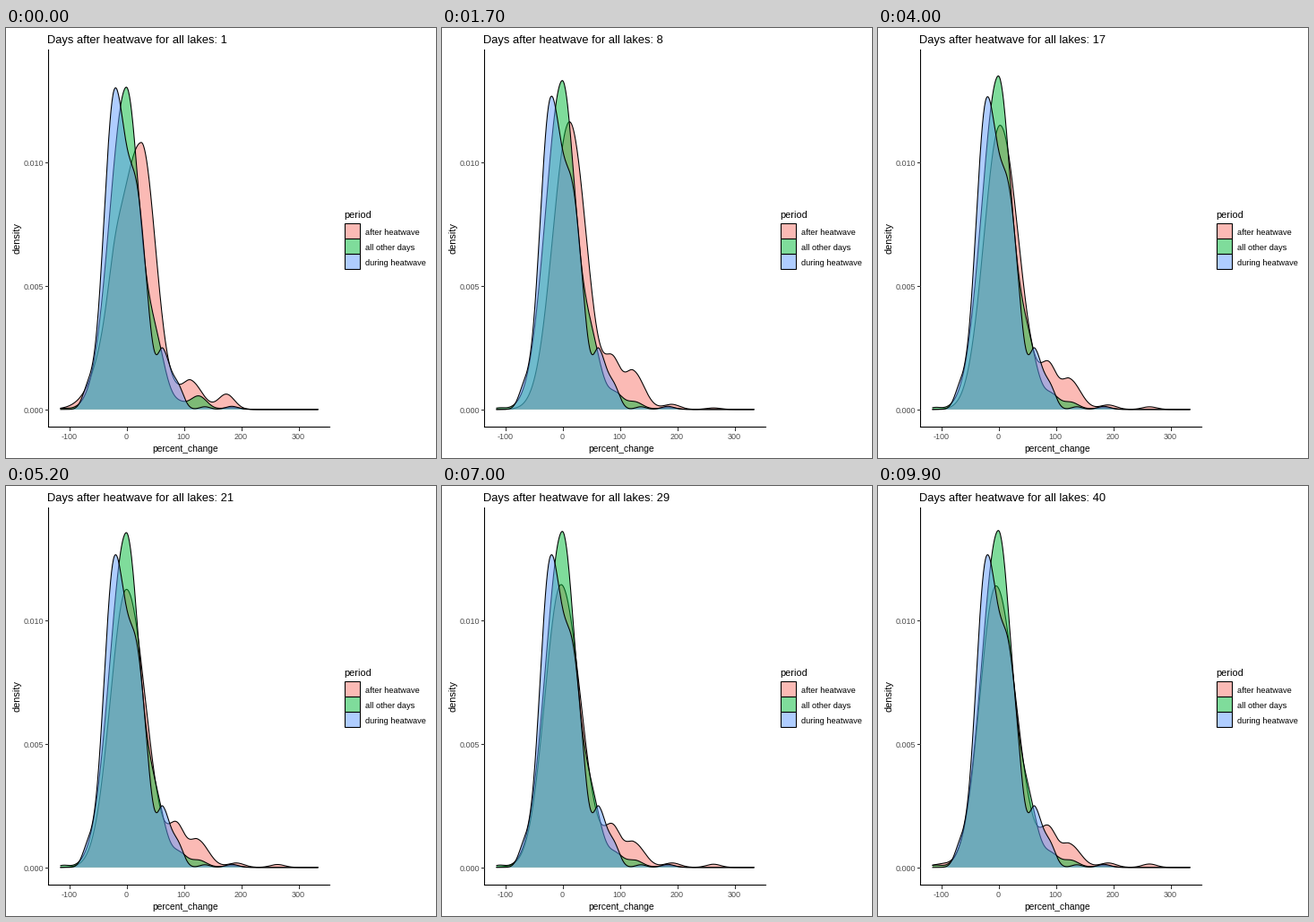
These frames come from a looping animation (480 px wide and 480 px high, 10000 ms). A matplotlib script:

```python
import numpy as np
import matplotlib.pyplot as plt
from matplotlib.animation import FuncAnimation
from matplotlib.colors import to_rgba
from matplotlib.patches import Polygon, Rectangle

FRAMES, INTERVAL = 100, 100
DAYS = 40
PX = 0.9  # points per pixel at 80 dpi
BASE = 425.8
STEP = 138  # pixels per 0.005 of density

plt.rcParams["font.family"] = ["Liberation Sans", "DejaVu Sans"]
fig = plt.figure(figsize=(6, 6), dpi=80, facecolor="white")
ax = fig.add_axes([0, 0, 1, 1])
ax.set(xlim=(0, 480), ylim=(480, 0))
ax.axis("off")

xs = np.linspace(61, 348, 512)


def bump(mu, h, left, right=None):
    """Bell with its own spread on each side."""
    s = np.where(xs < mu, left, right or left)
    return h * np.exp(-0.5 * ((xs - mu) / s) ** 2)


def after(f):
    early, slow = np.exp(-f / 6), np.exp(-f / 30)
    sway = np.cos(2 * np.pi * f / 29) * np.exp(-f / 60)
    return (
        bump(131 + 20 * slow, 312 - 14 * sway, 18 + 9.5 * early, 22 - 6 * slow)
        + bump(121, 24 * early, 7)
        + bump(191, 37 + 25 * slow - 52 * early, 9)
        + bump(214 - 7 * early, 24 + 34 * slow - 28 * early, 9, 12)
        + bump(257 - 11 * early, 5 + 12 * early, 9)
        + bump(303, 4 - 4 * slow, 8)
        + bump(70, 3.5 * (f / FRAMES) ** 6, 12, 9)
    )


def other(f):
    early, slow = np.exp(-f / 6), np.exp(-f / 30)
    return (
        bump(134.2, 376 - 17 * slow, 18.5, 14.5)
        + bump(167, 66, 11)
        + bump(194, 13 + 7 * slow - 14 * early, 8)
        + bump(215, 8 + 7 * early, 9)
        + bump(252, 2, 10)
        + bump(64, 2.5 - 1.5 * slow, 6)
    )


def during(f):
    return (
        bump(121, 338 + 10 * np.exp(-f / 6), 11.7, 12.5)
        + bump(91, 18, 6)
        + bump(147, 206, 10.5, 11)
        + bump(175.5, 60, 6, 8)
        + bump(192, 23, 6.5)
        + bump(222, 3, 6)
        + bump(252, 3.5, 7)
    )


def text(x, y, s, size, color="black", **kw):
    return ax.text(x, y, s, fontsize=size * PX, color=color, **kw)


def line(x, y, color="black", **kw):
    return ax.plot(x, y, color=color, lw=1.07 * PX, **kw)[0]


# Axes
line([47, 47], [24, 445])
line([47, 361], [445, 445])
for v in range(-100, 301, 100):
    x = 135 + 0.64 * v
    line([x, x], [446, 449], "#333333")
    text(x - 0.7, 459, str(v), 9, "#4D4D4D", ha="center")
for k in range(3):
    y = 426 - STEP * k
    line([44, 47], [y, y], "#333333")
    text(42.5, y + 4, f"{0.005 * k:.3f}", 9, "#4D4D4D", ha="right")
text(163.5, 473, "percent_change", 10.3)
text(12.5, 234.5, "density", 11, ha="center", va="center", rotation=90)
title = text(46.5, 17, "", 12.9)

# Legend and density layers
text(377.5, 212, "period", 11)
layers = []
for k, (name, color, curve) in enumerate([
    ("after heatwave", "#F8766D", after),
    ("all other days", "#00BA38", other),
    ("during heatwave", "#619CFF", during),
]):
    top = 218 + 17 * k
    fill = to_rgba(color, 0.5)
    ax.add_patch(Rectangle((378, top), 17, 17, fc=fill, ec="black", lw=1.07 * PX))
    text(401, top + 13, name, 9.3)
    area = ax.add_patch(Polygon([[0, 0]] * 3, fc=fill, ec="none", zorder=3 + 2 * k))
    layers.append((curve, area, line([], [], zorder=4 + 2 * k)))


def update(f):
    day = round(1 + (DAYS - 1) * f / (FRAMES - 1))
    title.set_text(f"Days after heatwave for all lakes: {day}")
    for curve, area, edge in layers:
        y = BASE - curve(f)
        area.set_xy(np.column_stack([np.r_[xs, xs[-1], xs[0]], np.r_[y, BASE, BASE]]))
        edge.set_data(xs, y)


anim = FuncAnimation(fig, update, frames=FRAMES, interval=INTERVAL, repeat=True, repeat_delay=0)
plt.show()
```
